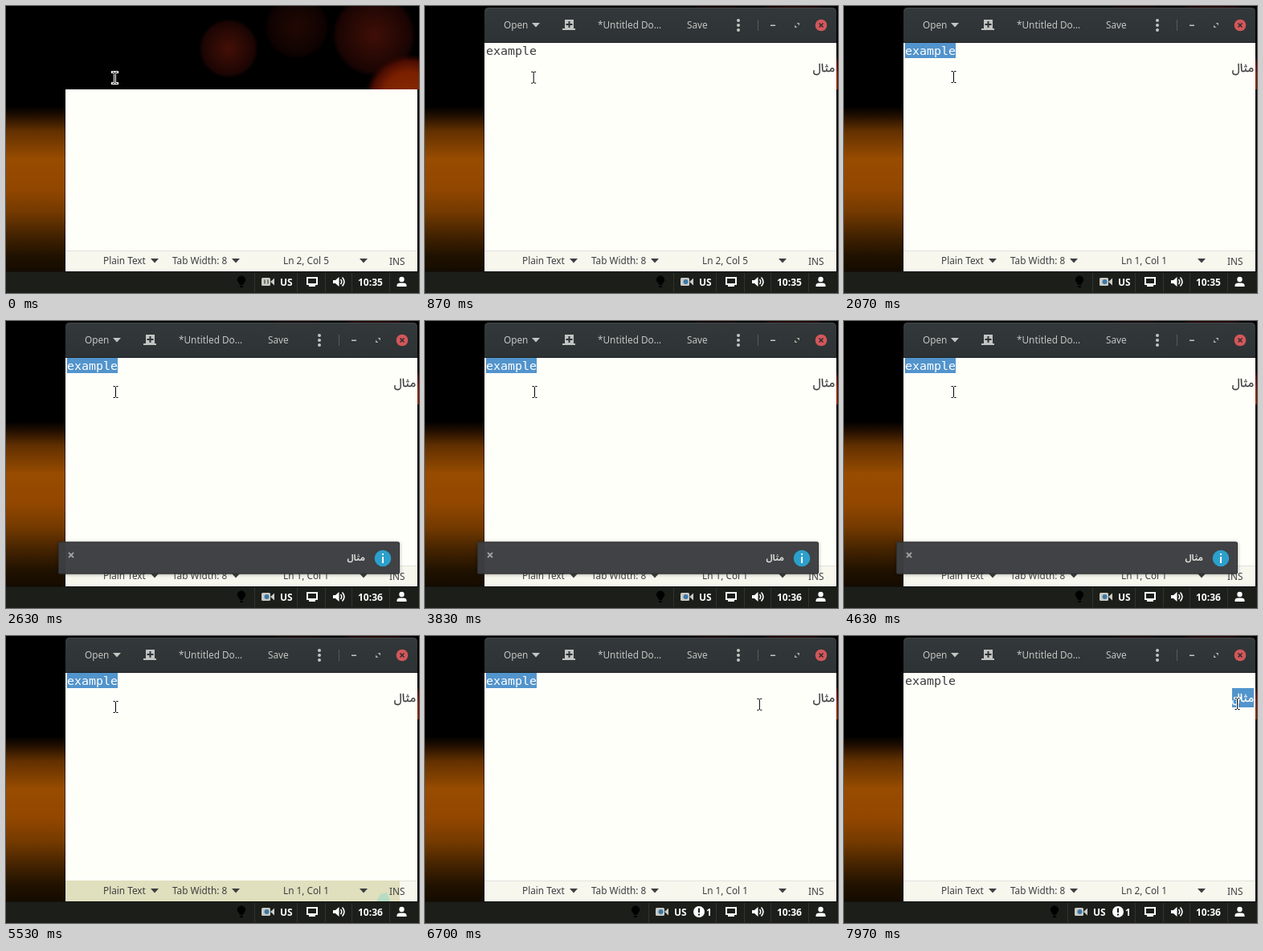
Write an HTML page that moves like this. It is 514x358 px and loops after 8 s.

```html
<!DOCTYPE html>
<html lang="en">
<head>
<meta charset="utf-8">
<title>Text editor</title>
<style>
html, body { margin: 0; width: 100%; height: 100%; overflow: hidden; background: #000; }
svg { display: block; }
#stage { width: 514px; height: 358px; font: 11.8px "Noto Sans", "Open Sans", sans-serif; }
text { white-space: pre; }
.bold { font-weight: 700; font-size: 12px; }
.mono { font: 14.95px "DejaVu Sans Mono", monospace; }
.arabic { font: 14.5px "Noto Sans Arabic", "DejaVu Sans", sans-serif; text-anchor: end; }
.small { font-size: 11px; font-weight: 700; }
</style>
</head>
<body>
<svg id="stage" viewBox="0 0 514 358">
  <defs>
    <linearGradient id="amber" x1="0" y1="0" x2="0" y2="1">
      <stop offset="0" stop-color="#000"/>
      <stop offset=".05" stop-color="#1c0c00"/>
      <stop offset=".15" stop-color="#623000"/>
      <stop offset=".32" stop-color="#984c00"/>
      <stop offset=".5" stop-color="#924700"/>
      <stop offset=".64" stop-color="#743a00"/>
      <stop offset=".78" stop-color="#442300"/>
      <stop offset=".9" stop-color="#211200"/>
      <stop offset="1" stop-color="#140b00"/>
    </linearGradient>
    <radialGradient id="ember">
      <stop offset="0" stop-color="#541308"/>
      <stop offset=".65" stop-color="#300a05"/>
      <stop offset=".88" stop-color="#220604"/>
      <stop offset="1" stop-color="#220604" stop-opacity="0"/>
    </radialGradient>
    <radialGradient id="rim">
      <stop offset="0" stop-color="#8a2c00"/>
      <stop offset=".6" stop-color="#7a2000"/>
      <stop offset=".85" stop-color="#4a0c02"/>
      <stop offset="1" stop-color="#300500" stop-opacity="0"/>
    </radialGradient>
    <linearGradient id="bar" x1="0" y1="0" x2="0" y2="1">
      <stop offset="0" stop-color="#33383a"/>
      <stop offset="1" stop-color="#2d3234"/>
    </linearGradient>
    <filter id="soft" x="-10%" y="-40%" width="120%" height="180%"><feGaussianBlur stdDeviation="2"/></filter>
    <path id="beam" d="M-3-7h2l1 1 1-1h2M0-6V6M-3 7h2l1-1 1 1h2"/>
  </defs>

  <rect width="514" height="358"/>
  <rect y="125" width="75" height="206" fill="url(#amber)"/>
  <svg width="514" height="104">
    <circle cx="277" cy="53" r="37" fill="url(#ember)" opacity=".8"/>
    <circle cx="362" cy="26" r="40" fill="url(#ember)" opacity=".4"/>
    <circle cx="458" cy="36" r="52" fill="url(#ember)" opacity=".75"/>
    <circle cx="502" cy="116" r="56" fill="url(#rim)"/>
  </svg>

  <!-- editor -->
  <path id="frame" fill="#fffffa"/>
  <g id="editor">
    <path d="M74 46V7q0-5 5-5H507q5 0 5 5V46Z" fill="url(#bar)"/>
    <path d="M75 6.5q1-4 5-4H506q4 0 5 4" fill="none" stroke="#42474a"/>
    <path d="M74 45.5H512" stroke="#1f2224"/>
    <g fill="#c3c5c2">
      <text x="98" y="28">Open</text>
      <path d="M133 21H143L138 26.5Z"/>
      <path d="M174 17H185V28H187V30H171V28H174Z"/>
      <path d="M179.5 19V27M175.5 23H183.5" stroke="#30353a" stroke-width="2"/>
      <text x="215" y="28">*Untitled Do…</text>
      <text x="326" y="28">Save</text>
      <circle cx="390" cy="18" r="2"/><circle cx="390" cy="24" r="2"/><circle cx="390" cy="30" r="2"/>
      <path d="M414 17h1v14h-1Z" fill="#555a5c"/>
      <path d="M430 23.5h6v1.5h-6Z"/>
      <path d="M462.5 21H466V24.5ZM460 23.5V27H463.5Z" fill="#a5a89c"/>
    </g>
    <circle cx="493" cy="24" r="7.3" fill="#d3575a"/>
    <path d="M490.5 21.5l5 5m0-5l-5 5" stroke="#2d2d2c" stroke-width="1.5"/>
    <rect id="latinMark" x="76" y="46" width="63" height="19" fill="#5294cc"/>
    <rect id="arabicMark" x="483" y="65" width="27" height="24" fill="#5294cc"/>
    <text id="latin" class="mono" x="76" y="61">example</text>
    <text id="arabic" class="arabic" x="510" y="82" stroke-width=".3">مثال</text>
  </g>
  <rect x="74" y="305" width="438" height="26" fill="#f7f7ee"/>
  <path d="M74 305.5H512" stroke="#e2e3dc"/>
  <g id="ghost">
    <rect x="74" y="305" width="416" height="26" fill="#e0dfbe"/>
    <path d="M461 331l5-9 8-2 4 11Z" fill="#b6dcc4"/>
  </g>
  <g fill="#3d3f40">
    <text x="121" y="322">Plain Text</text>
    <text x="207" y="322">Tab Width: 8</text>
    <text id="place" x="345" y="322"></text>
    <text x="477" y="323">INS</text>
    <path d="M180 315h10l-5 5.5ZM281 315h10l-5 5.5ZM440 315h10l-5 5.5Z"/>
  </g>
  <path d="M73.5 104V331" stroke="#000" opacity=".5"/>

  <!-- notification -->
  <g id="notice">
    <rect x="65" y="276" width="425" height="40" rx="2" filter="url(#soft)" opacity=".35"/>
    <rect x="65" y="275.5" width="425" height="40" rx="2" fill="#3d3f42" fill-opacity=".96"/>
    <rect x="65.5" y="276" width="424" height="39" rx="2" fill="none" stroke="#2e3032"/>
    <path d="M78 289l6 6m0-6l-6 6" stroke="#a0a2a0" stroke-width="1.8"/>
    <text class="arabic small" x="447" y="299" fill="#dadbd8">مثال</text>
    <circle cx="469" cy="296" r="10.3" fill="#2ca0cc"/>
    <path d="M468 290h2v2h-2ZM468 294h2v8h-2Z" fill="#fff"/>
  </g>

  <!-- panel -->
  <rect y="331" width="514" height="27" fill="#1c1e1a"/>
  <path d="M0 331.5H514" stroke="#121312"/>
  <g id="tray">
    <path d="M291 348q0-2-2-3.5a5 5 0 1 1 8 0q-2 1.500-2 3.5ZM291 349h4v2h-4Z" fill="#000"/>
    <path d="M309.5 333V357" stroke="#323330"/>
    <rect x="318" y="339" width="11" height="10" rx="1.5" fill="#c9cac4"/>
    <path d="M329 344l5-4.5v9Z" fill="#c9cac4"/>
    <path id="idle" d="M321 341.5h2v5h-2ZM325 341.5h2v5h-2Z" fill="#77776a"/>
    <circle id="recording" cx="324.5" cy="344" r="3" fill="#3c78a8"/>
    <text class="bold" x="341" y="349" fill="#fff">US</text>
  </g>
  <g id="unread" fill="#fff">
    <circle cx="341" cy="344" r="7"/>
    <path d="M340 339.5h2v5.5h-2ZM340 346.5h2v2h-2Z" fill="#1c1e1a"/>
    <text class="bold" x="350" y="349">1</text>
  </g>
  <path d="M362.5 333V357M397.5 333V357M430.5 333V357M477.5 333V357" stroke="#323330"/>
  <g fill="#fff">
    <path fill-rule="evenodd" d="M374 338h14v10h-3v2h-8v-2h-3ZM376 340v6h10v-6Z"/>
    <path d="M407 342h3l4.5-4v12l-4.5-4h-3Z"/>
    <path d="M416.5 341q2.5 3 0 6M418.5 338.5q5 5.5 0 11" fill="none" stroke="#fff" stroke-width="1.5"/>
    <text id="clock" class="bold" x="438" y="349"></text>
    <circle cx="492.5" cy="341" r="3.2"/>
    <path d="M486.5 350v-1.5q0-3 4-3h4q4 0 4 3V350Z"/>
  </g>

  <g id="pointer" fill="none">
    <use href="#beam" stroke="#fff" stroke-width="3" stroke-linecap="square"/>
    <use href="#beam" stroke="#000" stroke-width="1"/>
  </g>
</svg>
<script>
const LOOP = 8000;
const INK = "#3a3b3c";
const el = id => document.getElementById(id);
const show = (id, on) => el(id).style.display = on ? "" : "none";
const ramp = (t, from, to) => Math.min(1, Math.max(0, (t - from) / (to - from)));
const ease = p => p * p * (3 - 2 * p);

// time, x, y
const pointerPath = [
  [0, 135.5, 89.5], [850, 135.5, 89.5], [1200, 108, 57.5], [1550, 108, 57.5],
  [1950, 136.5, 88.5], [6100, 136.5, 88.5], [6950, 489.5, 84.5], [LOOP, 489.5, 84.5]
];

function pointerAt(t) {
  const i = pointerPath.findIndex(step => step[0] > t);
  const [t0, x0, y0] = pointerPath[i - 1], [t1, x1, y1] = pointerPath[i];
  const p = ease(ramp(t, t0, t1));
  return [x0 + (x1 - x0) * p, y0 + (y1 - y0) * p];
}

function paintWord(id, picked) {
  show(id + "Mark", picked);
  el(id).setAttribute("fill", picked ? "#fff" : INK);
  el(id).setAttribute("stroke", picked ? "#fff" : INK);
}

function draw(t) {
  const opened = t >= 30;
  const latinPicked = t >= 1400 && t < 7200;
  const arabicPicked = t >= 7200;
  const unread = t >= 5680;

  show("editor", opened);
  el("frame").setAttribute("d", `M74 331V${opened ? 46 : 104}H512V331Z`);
  paintWord("latin", latinPicked);
  paintWord("arabic", arabicPicked);
  el("place").textContent = latinPicked ? "Ln 1, Col 1" : arabicPicked ? "Ln 2, Col 1" : "Ln 2, Col 5";

  el("notice").style.opacity = ramp(t, 2300, 2500) * (1 - ramp(t, 5300, 5500));
  show("ghost", t >= 5480 && t < 5600);
  el("clock").textContent = t < 2400 ? "10:35" : "10:36";
  show("idle", !opened);
  show("recording", opened);
  show("unread", unread);
  el("tray").setAttribute("transform", `translate(${unread ? -31 : 0} 0)`);
  el("pointer").setAttribute("transform", `translate(${pointerAt(t)})`);
}

el("latin").setAttribute("stroke-width", 0);

const start = performance.now();
function tick(now) {
  draw(Math.max(0, now - start) % LOOP);
  requestAnimationFrame(tick);
}
draw(0);
requestAnimationFrame(tick);
</script>
</body>
</html>
```
